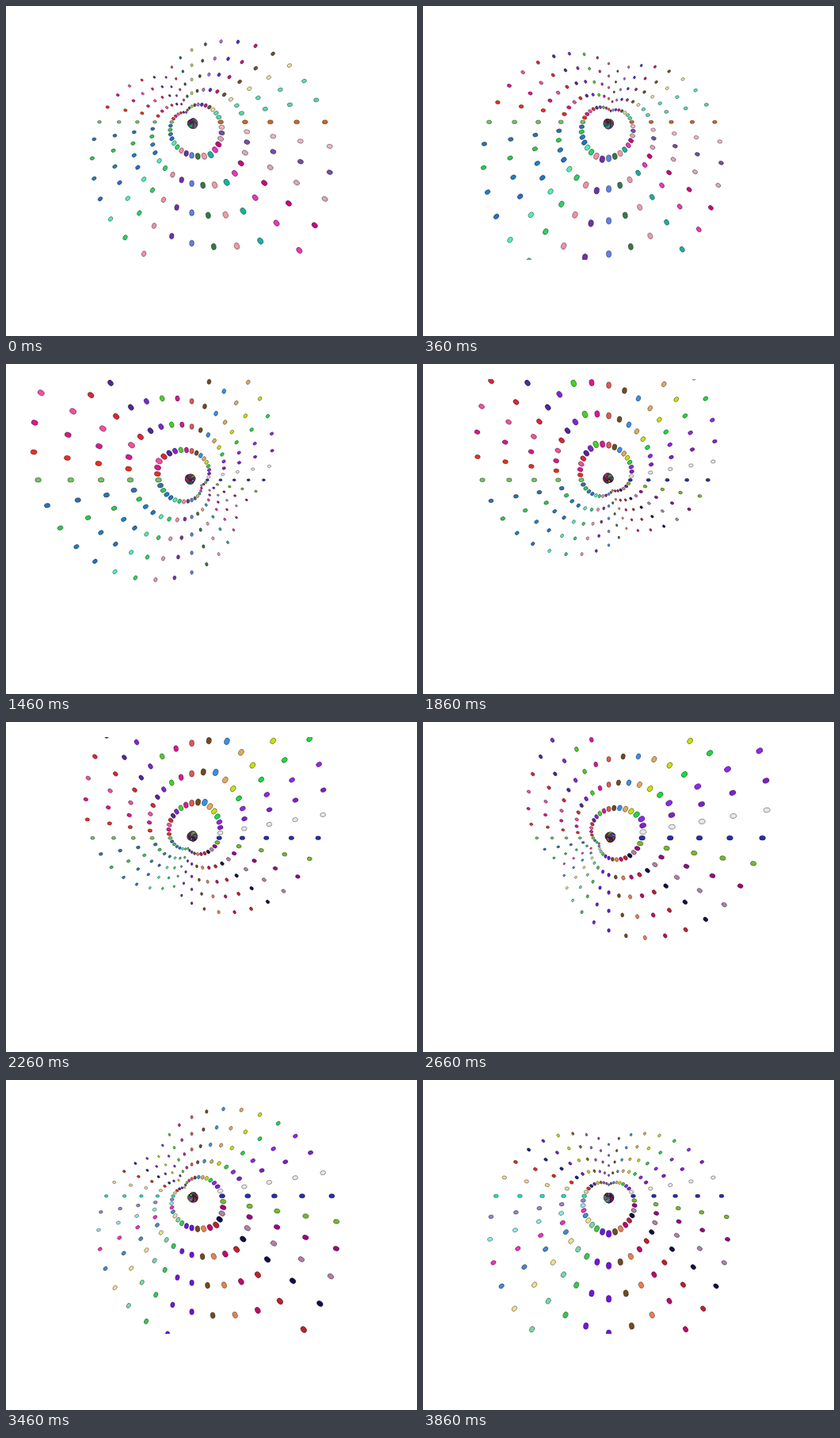
An HTML page with a canvas for the animation above (3960 ms loop, 519 by 416 pixels).

```html
<!DOCTYPE html>
<html lang="en">
<head>
<meta charset="utf-8">
<title>Dot spiral</title>
<style>
  html, body { margin: 0; width: 100%; height: 100%; overflow: hidden; background: #fff; }
  canvas { display: block; }
</style>
</head>
<body>
<canvas id="stage" width="519" height="416"></canvas>
<script>
const ctx = document.getElementById('stage').getContext('2d');
const LOOP = 3960, SPOKES = 36;
const CX = 234.6, CY = 146.2;
const TOP = 19, BOTTOM = 320;
const RINGS = [0.022, 0.217, 0.4, 0.59, 0.788, 1];

// One colour per spoke; the sequence runs on past a full turn.
const COLORS = `
  #d63a40 #0f6b68 #b5d94a #5b4a3a #b56adf #4a2be0 #c41a78 #705030 #e8e0a0
  #5fe0b0 #5ad8a8 #c8682e #f4b4c8 #7250a8 #d8a8b8 #c80880 #e838b8 #18b0a0
  #f09aa8 #387848 #6080e8 #7030a8 #f090a8 #30d068 #50f0b0 #2870c8 #2080c0
  #30c850 #3070b0 #78c068 #e83020 #d81890 #f050a0 #d82838 #502898 #7a28d0
  #48d028 #d81898 #e05858 #704c20 #3890e8 #e0a860 #c8e010 #20d840 #9028e8
  #8020c8 #e8e8e8 #2830a8 #78b830 #980880 #b080a8 #101048 #c02030 #c00868
  #e88050 #704c20 #7010e8 #7018e0 #38c850 #78d8a8 #f0e090 #4888d0 #f030c0
  #90e8e8 #9088c8 #28e0b8 #f0d890 #d83020 #182878 #7020c0 #c0d818 #806020
  #a050c0 #a04898 #7060c8`.trim().split(/\s+/);

function drawDot(angle, radius, reach, color) {
  ctx.beginPath();
  ctx.ellipse(
    CX + radius * Math.sin(angle), CY - radius * Math.cos(angle),
    0.0185 * reach + 0.25, 0.0135 * reach + 0.25,
    angle - Math.PI / 2, 0, 2 * Math.PI
  );
  ctx.fillStyle = color;
  ctx.fill();
  ctx.stroke();
}

function draw(step) {
  ctx.fillStyle = '#fff';
  ctx.fillRect(0, 0, 519, 416);
  ctx.save();
  ctx.beginPath();
  ctx.rect(0, TOP, 519, BOTTOM - TOP);
  ctx.clip();
  ctx.lineWidth = 0.6;
  ctx.strokeStyle = 'rgba(0, 0, 0, 0.65)';
  for (let n = 1; n <= SPOKES; n++) {
    const index = step + n;
    const angle = (330 + 10 * index) * Math.PI / 180;
    // Reach grows evenly with the distance from the shortest spoke.
    const reach = 65 + 8.6 * Math.min(n, SPOKES - n);
    for (const ring of RINGS) drawDot(angle, ring * reach, reach, COLORS[index - 1]);
  }
  ctx.restore();
}

let shown = -1;
const start = performance.now();

function tick() {
  const t = (performance.now() - start) % LOOP;
  const step = t < 60 ? 0 : 1 + Math.floor((t - 60) / 100);
  if (step !== shown) draw(shown = step);
  requestAnimationFrame(tick);
}
tick();
</script>
</body>
</html>
```
